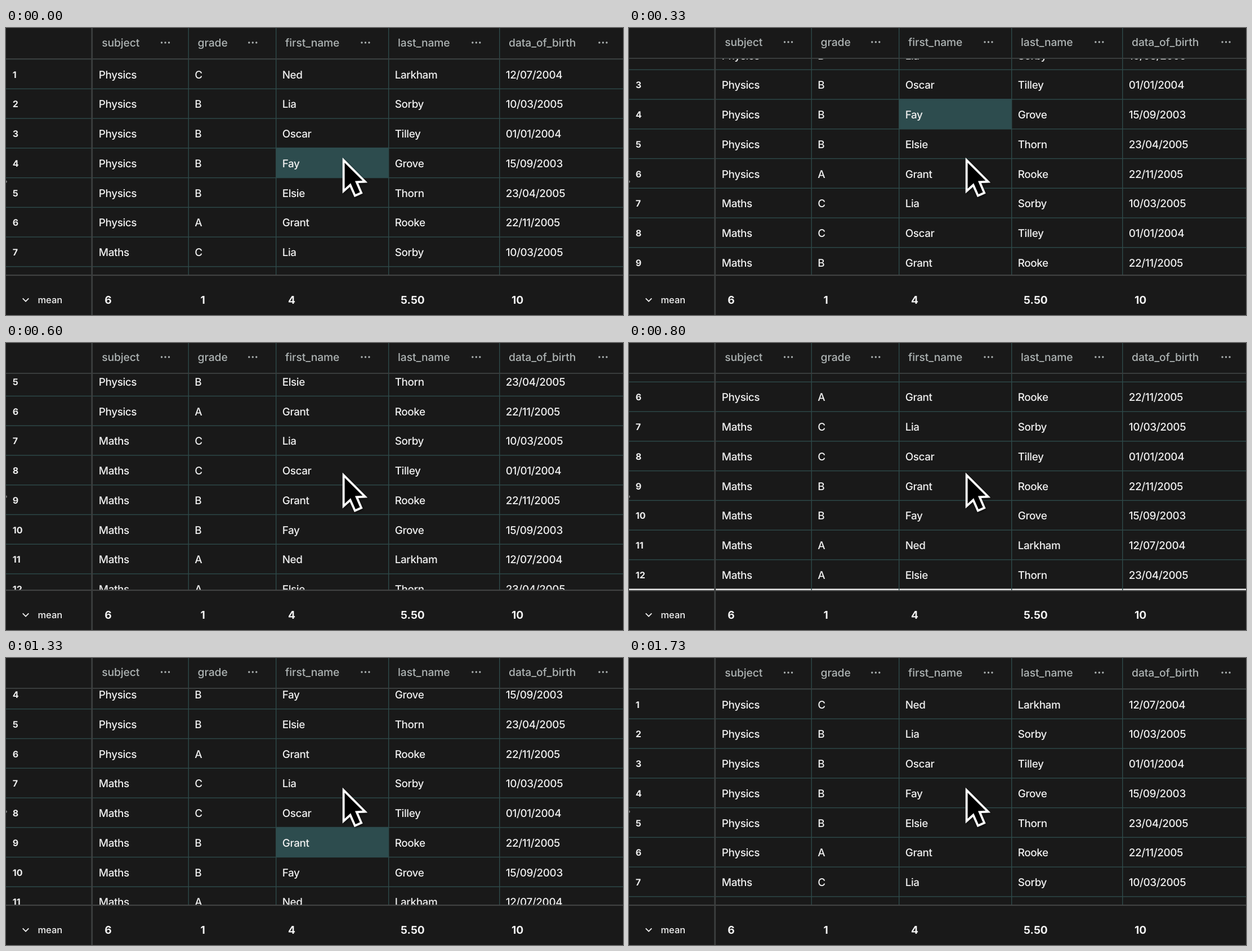
An HTML page that plays this animation: 1096x511 px, repeating every 1.79 s.

```html
<!DOCTYPE html>
<html lang="en">
<head>
<meta charset="utf-8">
<title>Scrolling table</title>
<style>
  html, body { margin: 0; width: 100%; height: 100%; overflow: hidden; background: #191919; }
  svg { display: block; width: 100vw; height: 100vh; font-family: Inter, Roboto, sans-serif; text-rendering: geometricPrecision; }
  .cell { font-size: 18.9px; font-weight: 500; letter-spacing: -.4px; fill: #f0f0f0; }
  .index { font-size: 16px; font-weight: 700; fill: #f0f0f0; }
  .head { font-size: 19.3px; font-weight: 500; letter-spacing: -.1px; fill: #aeb4b4; }
  .total { font-size: 19.2px; font-weight: 700; fill: #f4f4f4; }
  .label { font-size: 16.5px; font-weight: 500; fill: #f0f0f0; }
  .dot { fill: #aeb4b4; }
  .line { fill: #2e4a4a; }
  .hover { fill: #2d4c4e; }
</style>
</head>
<body>
<svg viewBox="0 0 1096 511">
  <defs>
    <clipPath id="view"><rect y="53.5" width="1096" height="386.5"/></clipPath>
    <filter id="shadow" x="-30%" y="-30%" width="160%" height="160%">
      <feDropShadow dx="1" dy="2" stdDeviation="2" flood-opacity=".5"/>
    </filter>
  </defs>
  <rect width="1096" height="511" fill="#191919"/>
  <g clip-path="url(#view)"><g id="table"></g></g>
  <g id="columns"></g>
  <g id="header"><rect y="53" width="1096" height="2" fill="#393d3d"/></g>
  <g id="footer">
    <rect y="439.2" width="1096" height="2" fill="#454646" id="edge"/>
    <path d="M29.7 481.3l5.3 5.4l5.3-5.4" fill="none" stroke="#f0f0f0" stroke-width="1.8"/>
  </g>
  <rect x="151.3" width="2.8" height="511" fill="#3c3f3f"/>
  <circle cx="-.5" cy="273.5" r="2.4" fill="#777"/>
  <path d="M599.7 235.3V290.3l11.8-10.8 8.4 19 11.2-5-8.3-19.2 15-.8Z" fill="#000" stroke="#fff"
        stroke-width="3.8" stroke-miterlimit="6" filter="url(#shadow)"/>
</svg>
<script>
const LOOP = 1790, ROW = 52.75, TOP = 55.6, MAX = 250;
const edges = [153.8, 324.2, 479.7, 679.7, 876.7];
const titles = ['subject', 'grade', 'first_name', 'last_name', 'data_of_birth'];
const menus = [283, 438.3, 638.5, 835.3, 1060.5];
const totals = ['6', '1', '4', '5.50', '10'];
const people = [
  ['Ned', 'Larkham', '12/07/2004'],
  ['Lia', 'Sorby', '10/03/2005'],
  ['Oscar', 'Tilley', '01/01/2004'],
  ['Fay', 'Grove', '15/09/2003'],
  ['Elsie', 'Thorn', '23/04/2005'],
  ['Grant', 'Rooke', '22/11/2005']
];
const order = [0, 1, 2, 3, 4, 5, 1, 2, 5, 3, 0, 4];
const grades = 'CBBBBACCBBAA';

const byId = id => document.getElementById(id);
const table = byId('table'), header = byId('header'), footer = byId('footer');

function add(parent, tag, attrs, text = '') {
  const el = document.createElementNS('http://www.w3.org/2000/svg', tag);
  for (const key in attrs) el.setAttribute(key, attrs[key]);
  el.textContent = text;
  parent.append(el);
  return el;
}
const write = (parent, kind, x, y, text) => add(parent, 'text', { class: kind, x, y }, text);
const box = (parent, kind, x, y, width, height) =>
  add(parent, 'rect', { class: kind, x, y, width, height });

for (let i = 0; i <= 12; i++) box(table, 'line', 0, TOP + i * ROW - 0.7, 1096, 1.4);

const hoverRow = row => box(table, 'hover', edges[2], TOP + (row - 1) * ROW - 1, 200, ROW + 1.4);
const firstHover = hoverRow(4), secondHover = hoverRow(9);

order.forEach((who, i) => {
  const y = TOP + i * ROW + 34;
  const values = [i < 6 ? 'Physics' : 'Maths', grades[i], ...people[who]];
  write(table, 'index', 11.8, y - 0.9, i + 1);
  values.forEach((value, c) => write(table, 'cell', edges[c] + 11, y, value));
});
add(table, 'rect', { y: 687.5, width: 1096, height: 2.6, fill: '#e6e6e6' });

edges.forEach((x, c) => {
  if (c) box(byId('columns'), 'line', x - 0.7, 0, 1.4, 440);
  write(header, 'head', x + 16.4, 31.7, titles[c]);
  for (const dx of [-6.5, 0, 6.5]) {
    add(header, 'circle', { class: 'dot', cx: menus[c] + dx, cy: 25, r: 1.7 });
  }
  write(footer, 'total', x + 21.4, 491, totals[c]);
});
write(footer, 'label', 56.4, 489.8, 'mean');

// Sine ease in and out, from 0 to 1
function ease(step, start, length) {
  const p = Math.min(1, Math.max(0, (step - start) / length));
  return (1 - Math.cos(Math.PI * p)) / 2;
}

function draw(time) {
  // Fifteen steps a second, with uneven 70/60/70 ms holds
  const rest = time % 200;
  const step = Math.floor(time / 200) * 3 + (rest >= 130 ? 2 : rest >= 70 ? 1 : 0);
  const scroll = MAX * (ease(step, 0.92, 10.17) - ease(step, 17.715, 6.23));
  table.setAttribute('transform', `translate(0 ${-scroll})`);
  header.setAttribute('transform', `translate(0 ${Math.max(0, 1 - scroll)})`);
  byId('edge').setAttribute('y', scroll > 245 ? 440 : 439.2);
  firstHover.setAttribute('visibility', step < 12 ? 'visible' : 'hidden');
  secondHover.setAttribute('visibility', step >= 13 && step < 24 ? 'visible' : 'hidden');
}

let begin;
function tick(now) {
  begin ??= now;
  draw((now - begin) % LOOP);
  requestAnimationFrame(tick);
}
draw(0);
requestAnimationFrame(tick);
</script>
</body>
</html>
```
